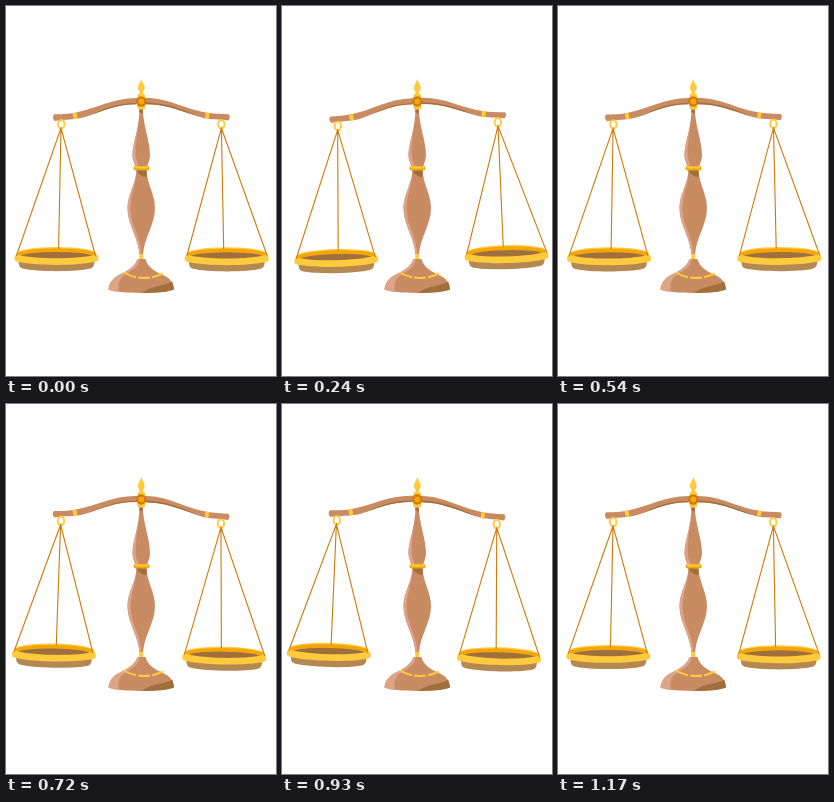
These frames come from a looping animation (270 by 370 pixels, 1.2 s). An HTML page:

```html
<!DOCTYPE html>
<html lang="en">
<head>
<meta charset="utf-8">
<title>Balance scales</title>
<style>
  html, body { margin: 0; width: 100%; height: 100%; overflow: hidden; background: #fff; }
  svg { display: block; width: 100vw; height: 100vh; }
  .wood { fill: #c98b62; }
  .light { fill: #dea488; }
  .shade { fill: #a0703c; }
  .bowl { fill: #b58852; }
  .gold { fill: #ffcb3d; }
  .amber { fill: #f2a60c; }
  .line { fill: none; stroke: #ffcb3d; stroke-width: 2; }
  .cord { fill: none; stroke: #cf7a0a; stroke-width: 1.1; }
</style>
</head>
<body>
<svg viewBox="0 0 270 370">
  <defs>
    <g id="pan-back">
      <path class="bowl" d="M-38 4C-38 9-37 11.500-34 12.500C-20 16 21 16 34 12.500C37 11.500 38 9 38 4Z"/>
      <ellipse class="gold" cy="-2.500" rx="40" ry="6.500"/>
      <ellipse class="amber" cy="-2" rx="39.500" ry="5.700"/>
      <ellipse class="shade" cy=".5" rx="36" ry="4.500"/>
    </g>
    <path id="pan-front" class="gold" d="M-39.500-1.500C-23 3.500 23 3.500 39.500-1.500C42.500-1.500 43 5 40 5.500C20 10-20 10-40 5.500C-43 5-42.500-1.500-39.500-1.500Z"/>
    <ellipse id="ring" class="line" rx="3.200" ry="4.300"/>
  </defs>

  <g id="stand">
    <path class="wood" d="M133.500 102H136.700C137 119 144 135 144 149C144 154 142 157 141 161H129.500C128.500 157 126.500 154 126.500 149C126.500 136 133.500 123 133.500 102Z"/>
    <path class="light" d="M133.400 112C132 128 126.500 138 126.500 149C126.500 154 128.500 157 129.500 161H133.500C127 150 130 138 133.400 112Z"/>
    <path class="shade" d="M133.500 102H136.700L136.900 108L133.300 106Z"/>
    <path class="wood" d="M130.500 164H140.500C141 178 149 188 149 202C149 219 138 231 137 249H133.500C132.500 231 121.500 219 121.500 202C121.500 188 130 178 130.500 164Z"/>
    <path class="light" d="M130.500 168C130 179 121.500 188 121.500 202C121.500 219 132.500 231 133.500 249H135.500C135 231 124.500 219 124.500 203C124.500 189 130 180 130.500 168Z"/>
    <path class="shade" d="M130.500 164H140.500L140.700 171C137 171 133 169 130.500 165Z"/>
    <rect class="amber" x="127.500" y="160" width="16" height="4.500" rx="2.200"/>
    <path class="line" d="M129 161.500H142" stroke-width="1"/>
    <path class="wood" d="M131.500 253H139.500C142 262 150 266 159 270C165 273 167.500 278 168 283.500C158 288 112 288 102.500 283.500C103 277 107 272 113 269C121 265 129 261 131.500 253Z"/>
    <path class="light" d="M131.500 253C129 261 121 265 113 269C107 272 103 277 102.500 283.500Q107 285.500 113 286C111 277 114 272 120 268C127 264 133 261 133.500 253Z"/>
    <path class="shade" d="M168 283.500C167.700 280 167 277.500 166 275.500C161 280 146 279 136 287C150 287 163 286 168 283.500Z"/>
    <path class="line" d="M118 266.500Q136 277 157 267.500" stroke-dasharray="13 2 12 2"/>
    <rect class="gold" x="133.300" y="248" width="4" height="5"/>
    <path class="gold" d="M135.300 73C136 76 138.700 79 138.700 81.500C138.700 84 137 85.500 136.800 87L139 89V91H131.600V89L133.800 87C133.600 85.500 131.900 84 131.900 81.500C131.900 79 134.600 76 135.300 73Z"/>
  </g>

  <g id="balance">
    <path class="wood" d="M48 108.300C56 108.300 62 108 70 106.500C92 102 107 92 130 92H140C163 92 178 103 200 106.500C208 108 215 108 222.500 108.300Q225 110 222.500 114.500C212 113 204 114 195 111.200C172 104 160 98.200 140 98.200H130C111 98.200 99 104 80 110.700C70 114 58 113 49 115Q45.500 112 48 108.300Z"/>
    <path class="shade" d="M82 110C99 104 111 98.200 130 98.200V97C111 97 100 102 82 110ZM195 111.200C172 104 160 98.200 140 98.200V96.500C160 97 173 102 195 111.200Z"/>
    <path class="gold" d="M66.500 107.200L70.500 106.400L71.500 112.700L68 113.300ZM199.700 106.400L203.700 107.200L202.500 113.300L199 112.500Z"/>
    <rect class="gold" x="131.300" y="89" width="8" height="14.500" rx="2"/>
    <circle cx="135.300" cy="95.500" r="5.200" fill="#cf7a0a"/>
    <circle class="amber" cx="135.300" cy="95.500" r="3"/>
    <use href="#ring" x="55.300" y="118.200"/>
    <use href="#ring" x="215.300" y="118.200"/>
    <use href="#pan-back" x="50.500" y="250"/>
    <use href="#pan-back" x="220.800" y="250.300"/>
    <use href="#pan-front" x="50.500" y="250"/>
    <use href="#pan-front" x="220.800" y="250.300"/>
    <path class="cord" d="M10.300 250L55 122L89.500 250M55 122L52.600 243M180.800 250L215.400 122L261.300 250M215.400 122L217.700 243"/>
  </g>
</svg>
<script>
  const balance = document.getElementById("balance");
  const LOOP = 1200, TILT = 1.4;
  // [time in ms, tilt as a share of TILT]
  const keys = [[0, 0], [240, -1], [900, 1], [LOOP, 0]];
  const ease = p => (1 - Math.cos(Math.PI * p)) / 2;

  function tiltAt(t) {
    const i = keys.findIndex(([end]) => t < end);
    const [t0, a] = keys[i - 1], [t1, b] = keys[i];
    return TILT * (a + (b - a) * ease((t - t0) / (t1 - t0)));
  }

  function draw() {
    const t = Math.floor(performance.now() % LOOP / 30) * 30;
    balance.setAttribute("transform", `rotate(${tiltAt(t)} 135.3 96)`);
    requestAnimationFrame(draw);
  }
  draw();
</script>
</body>
</html>
```
